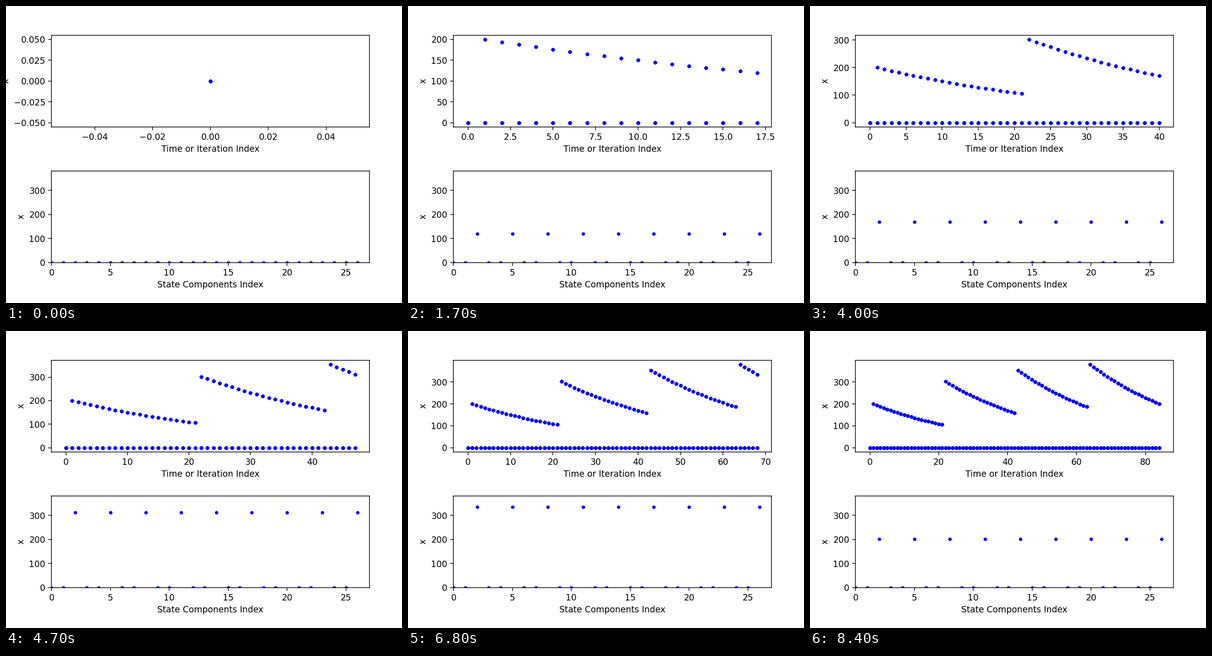
A matplotlib script for the animation above (8500 ms loop, 864 by 648 pixels).

```python
import numpy as np
import matplotlib.pyplot as plt
from matplotlib.animation import FuncAnimation

W, H, DPI = 864, 648, 135
STEPS, PARTS = 85, 27
DOSE, PERIOD, RATE = 200, 21, 0.032

plt.rcParams["font.family"] = "DejaVu Sans"


def simulate():
    """Every third component decays and gets a dose once per period."""
    x = np.zeros((STEPS, PARTS))
    for t in range(1, STEPS):
        x[t, 2::3] = x[t - 1, 2::3] * np.exp(-RATE)
        if t % PERIOD == 1:
            x[t, 2::3] += DOSE
    return x


def add_axes(top, bottom, xlabel):
    left, right = 99.2, 793.2
    ax = fig.add_axes([left / W, 1 - bottom / H, (right - left) / W, (bottom - top) / H])
    ax.set_xlabel(xlabel)
    ax.set_ylabel("x")
    return ax


state = simulate()
fig = plt.figure(figsize=(W / DPI, H / DPI), dpi=DPI)
history_ax = add_axes(63.7, 263.7, "Time or Iteration Index")
current_ax = add_axes(359.8, 559.6, "State Components Index")

traces = history_ax.plot([0], state[:1], "b.")
current, = current_ax.plot(np.arange(PARTS), state[0], "b.")
current_ax.set_xlim(0, PARTS)
current_ax.set_ylim(0, state.max())


def update(frame):
    past = np.arange(frame + 1)
    for i, line in enumerate(traces):
        line.set_data(past, state[:frame + 1, i])
    history_ax.relim()
    history_ax.autoscale_view()
    current.set_ydata(state[frame])
    return [*traces, current]


anim = FuncAnimation(fig, update, frames=STEPS, interval=100,
                     repeat=True, repeat_delay=0, blit=False)
plt.show()
```
